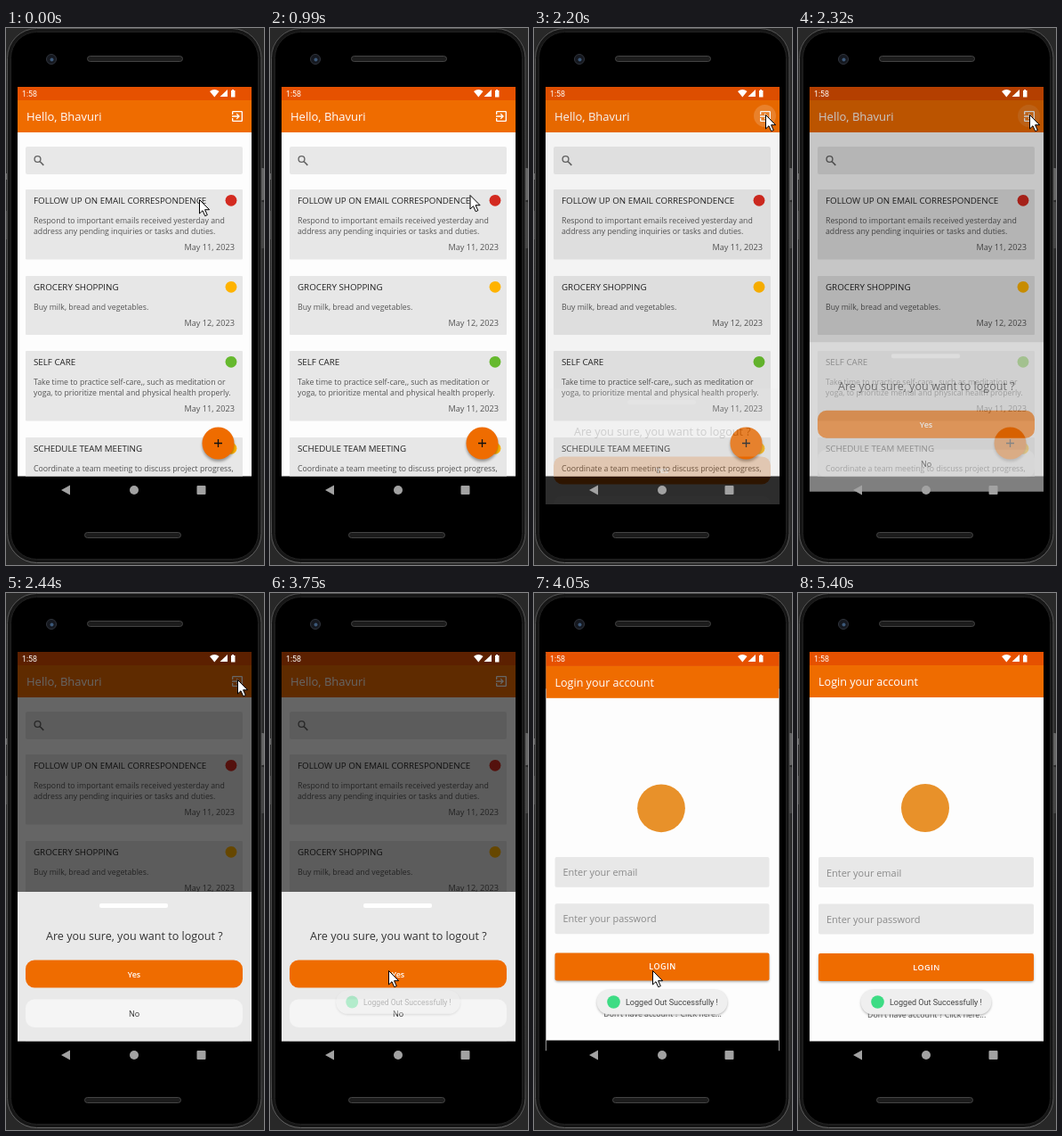
These frames come from a looping animation (290x602 px, 5800 ms). An HTML page:

```html
<!DOCTYPE html>
<html lang="en">
<head>
<meta charset="utf-8">
<title>Logout flow</title>
<style>
  html, body { margin: 0; width: 100%; height: 100%; overflow: hidden; background: #282828; }
  svg { display: block; width: 290px; height: 602px; }
  text { font-family: "Open Sans", "Noto Sans", sans-serif; fill: #555; white-space: pre; }
  .head { font-size: 12.6px; font-weight: 500; fill: #fff; }
  .title { font-size: 9.78px; fill: #222; }
  .body { font-size: 8.75px; }
  .date { font-size: 9.2px; text-anchor: end; }
  .ask { font-size: 12.58px; fill: #333; }
  .btn { font-size: 9px; text-anchor: middle; fill: #333; }
  .light { fill: #fff; font-weight: 600; }
  .hint { font-size: 10.95px; fill: #8a8a8a; }
  .system { font-family: Roboto, sans-serif; font-size: 9.04px; fill: #444; }
</style>
</head>
<body>
<svg viewBox="0 0 290 602">
  <defs>
    <clipPath id="screen"><rect x="13" y="66" width="263" height="468"/></clipPath>
    <clipPath id="app"><rect x="13" y="66" width="263" height="436.5"/></clipPath>
    <filter id="soft" x="-30%" y="-30%" width="160%" height="160%"><feGaussianBlur stdDeviation="1.6"/></filter>
    <linearGradient id="rim" x2="0" y2="1">
      <stop offset="0" stop-color="#555"/>
      <stop offset=".9" stop-color="#444"/>
      <stop offset="1" stop-color="#666"/>
    </linearGradient>
    <g id="bars">
      <rect x="13" y="66" width="263" height="437" fill="#fdfdfd"/>
      <rect x="13" y="66" width="263" height="15" fill="#e65100"/>
      <rect x="13" y="81" width="263" height="36" fill="#ef6c00"/>
    </g>
  </defs>

  <!-- phone -->
  <g fill="#666">
    <rect x="286" y="157" width="4" height="36" rx="1"/>
    <rect x="286" y="195" width="4" height="52" rx="1" fill="#444"/>
    <rect x="0" y="163" width="3" height="7"/>
    <rect x="0" y="205" width="3" height="32" fill="#444"/>
  </g>
  <rect x="1.5" y=".5" width="285.5" height="599" rx="33" fill="#161616" stroke="url(#rim)"/>
  <rect x="5.5" y="4.5" width="278" height="591" rx="29" stroke="#222"/>
  <g fill="#1c1c1c" stroke="#444">
    <rect x="91.5" y="31.5" width="107" height="6" rx="3"/>
    <rect x="88.5" y="565.5" width="108" height="6" rx="3"/>
  </g>
  <circle cx="51" cy="35" r="5.5" fill="#15181f" stroke="#30343c"/>
  <circle cx="51.5" cy="35.5" r="2" fill="#3c5878"/>

  <g clip-path="url(#screen)">
    <g id="home"><g clip-path="url(#app)">
      <use href="#bars"/>
      <text class="head" style="font-size:13px" x="23" y="104">Hello, Bhavuri</text>
      <circle id="ripple" cx="259.5" cy="98.5" r="12.5" fill="#fff"/>
      <path transform="translate(252 91) scale(.667)" fill="#fff" d="M10.09 15.59L11.5 17l5-5-5-5-1.41 1.41L12.67 11H3v2h9.67zM19 3H5a2 2 0 0 0-2 2v4h2V5h14v14H5v-4H3v4a2 2 0 0 0 2 2h14a2 2 0 0 0 2-2V5a2 2 0 0 0-2-2z"/>
      <rect x="22" y="133" width="244" height="31" rx="2" fill="#e8e8e8"/>
      <g fill="none" stroke="#666" stroke-width="1.4">
        <circle cx="35.5" cy="147" r="3.4"/>
        <path d="M38 149.5l4.3 4.3" stroke-width="1.7"/>
      </g>
      <g id="cards"></g>
      <circle cx="238.5" cy="468" r="18" opacity=".35" filter="url(#soft)"/>
      <circle cx="238.5" cy="465.5" r="18" fill="#ef6c00"/>
      <path d="M234 465.5h9M238.5 461v9" stroke="#111" stroke-width="1.3"/>
    </g></g>

    <rect id="dim" x="13" y="66" width="263" height="437"/>

    <g id="sheet">
      <rect x="13" y="335" width="263" height="167.5" fill="#e9e9e9"/>
      <rect x="105" y="348" width="77" height="5" rx="2" fill="#fff"/>
      <text class="ask" x="45" y="388.5">Are you sure, you want to logout ?</text>
      <rect x="22" y="411.5" width="244" height="31" rx="10" fill="#ef6c00"/>
      <text class="btn light" x="144" y="430.5">Yes</text>
      <rect x="22" y="455.5" width="244" height="31.5" rx="10" fill="#f5f5f5"/>
      <text class="btn" x="144" y="474.5">No</text>
    </g>

    <g id="login">
      <rect x="13" y="66" width="263" height="468"/>
      <g clip-path="url(#app)">
        <use href="#bars"/>
        <text class="head" x="23" y="104">Login your account</text>
        <circle cx="143" cy="241" r="27" fill="#e8912a"/>
        <g fill="#e8e8e8">
          <rect x="23" y="296" width="242" height="34" rx="2"/>
          <rect x="23" y="348.5" width="242" height="34" rx="2"/>
        </g>
        <text class="hint" x="32" y="317.5">Enter your email</text>
        <text class="hint" x="32" y="369.5">Enter your password</text>
        <rect x="23.5" y="406" width="241" height="30" rx="2" opacity=".4" filter="url(#soft)"/>
        <rect x="23" y="404" width="242" height="31" rx="2" fill="#ef6c00"/>
        <text class="btn light" x="144.5" y="423" letter-spacing=".5">LOGIN</text>
        <text class="body" x="78" y="475.5">Don't have account ? Click here...</text>
      </g>
    </g>

    <g id="toast">
      <rect x="71" y="446" width="146" height="27.5" rx="13.8" opacity=".35" filter="url(#soft)"/>
      <rect x="70.5" y="444.5" width="147" height="28" rx="14" fill="#efefef"/>
      <circle cx="89.5" cy="458.5" r="7.3" fill="#3ddc84"/>
      <text class="system" x="103" y="461.7">Logged Out Successfully !</text>
    </g>

    <!-- system bars -->
    <g fill="#fff">
      <text class="system" style="font-size:8.8px;fill:#fff" x="18" y="76.8">1:58</text>
      <path d="M229 71q5.3-4 10.6 0l-5.3 6.5zM249 69v8h-8.500z"/>
      <path d="M253 70h1v-1h2v1h1.5v7.5H253z"/>
    </g>
    <g fill="#a2a2a2">
      <path d="M62 518l10-5.5v11z"/>
      <circle cx="144" cy="518" r="5"/>
      <rect x="214.5" y="513" width="10" height="10" rx="1"/>
    </g>
  </g>

  <path id="cursor" d="M.5.5v15.5l3.5-3.3 2.7 6 2.6-1.1-2.7-5.9h5z" fill="#fff" stroke="#000"/>
</svg>

<script>
const LOOP = 5800;
const STEP = 130; // motion advances in visible steps of this many ms
const $ = id => document.getElementById(id);

const tasks = [
  ['#d32a20', 'FOLLOW UP ON EMAIL CORRESPONDENCE', 'May 11, 2023',
    'Respond to important emails received yesterday and', 'address any pending inquiries or tasks and duties.'],
  ['#ffb300', 'GROCERY SHOPPING', 'May 12, 2023', 'Buy milk, bread and vegetables.'],
  ['#66b92e', 'SELF CARE', 'May 11, 2023',
    'Take time to practice self-care,, such as meditation or', 'yoga, to prioritize mental and physical health properly.'],
  ['#ffb300', 'SCHEDULE TEAM MEETING', '', 'Coordinate a team meeting to discuss project progress,'],
];

let top_ = 181;
$('cards').innerHTML = tasks.map(([color, title, date, ...lines]) => {
  const y = Math.round(top_), height = 53.6 + 12.4 * lines.length;
  top_ += height + 18.5;
  return `<rect x="22" y="${y}" width="244" height="${height}" rx="1" fill="#e7e7e7"/>
    <text class="title" x="31" y="${y + 16}">${title}</text>
    <circle cx="253" cy="${y + 12.3}" r="6.4" fill="${color}"/>
    ${lines.map((s, i) => `<text class="body" x="31" y="${y + 37.7 + 12.4 * i}">${s}</text>`).join('')}
    <text class="date" x="257" y="${y + height - 10}">${date}</text>`;
}).join('');

// Stepped progress from 0 to 1; the first step is taken at the start time.
const progress = (t, start, steps) =>
  Math.min(1, Math.max(0, Math.floor((t - start) / STEP) + 1) / steps);
const easeOut = p => 1 - (1 - p) ** 3;
const bezier = (u, a, b, c) => a * (1 - u) ** 2 + 2 * b * u * (1 - u) + c * u * u;

// Each curve starts where the one before it ends.
const moves = [
  { start: 990, steps: 1, bend: [221, 190], to: [224.5, 187] },
  { start: 1110, steps: 5, bend: [244, 141], to: [260, 97] },
  { start: 2680, steps: 5, bend: [347, 195], to: [133, 423] },
  { start: 4880, steps: 5, bend: [238, 414], to: [264, 605] },
];

function cursorAt(t) {
  let pos = [217, 192];
  for (const { start, steps, bend, to } of moves) {
    const u = easeOut(progress(t, start, steps));
    pos = pos.map((from, i) => bezier(u, from, bend[i], to[i]));
  }
  return pos;
}

function place(id, opacity, x = 0, y = 0) {
  $(id).setAttribute('opacity', opacity);
  $(id).setAttribute('transform', `translate(${x} ${y})`);
}

function zoom(id, opacity, s, cx, cy) {
  $(id).setAttribute('opacity', opacity);
  $(id).setAttribute('transform', `translate(${cx * (1 - s)} ${cy * (1 - s)}) scale(${s})`);
}

function draw(t) {
  const open = progress(t, 2180, 3);
  const toast = progress(t, 3750, 2);
  const swap = progress(t, 3880, 3);
  const shown = swap ? 0 : 1;

  place('cursor', 1, ...cursorAt(t));
  place('ripple', t < 2050 ? 0 : .2 * (1 - open ** 2));
  place('dim', shown * .6 * open ** 2.5);
  place('sheet', shown * open ** 1.5, 0, 155 * (1 - open) ** 2);
  zoom('home', 1, 1 + .08 * swap, 144.5, 300);
  zoom('login', Math.min(1, 2 * swap), 1 - .12 * (1 - swap) ** 3, 144.5, 300);
  zoom('toast', toast ** 1.5, .9 + .1 * toast, 144, 458.5);
}

const begin = performance.now();
function frame() {
  draw((performance.now() - begin) % LOOP);
  requestAnimationFrame(frame);
}
frame();
</script>
</body>
</html>
```
